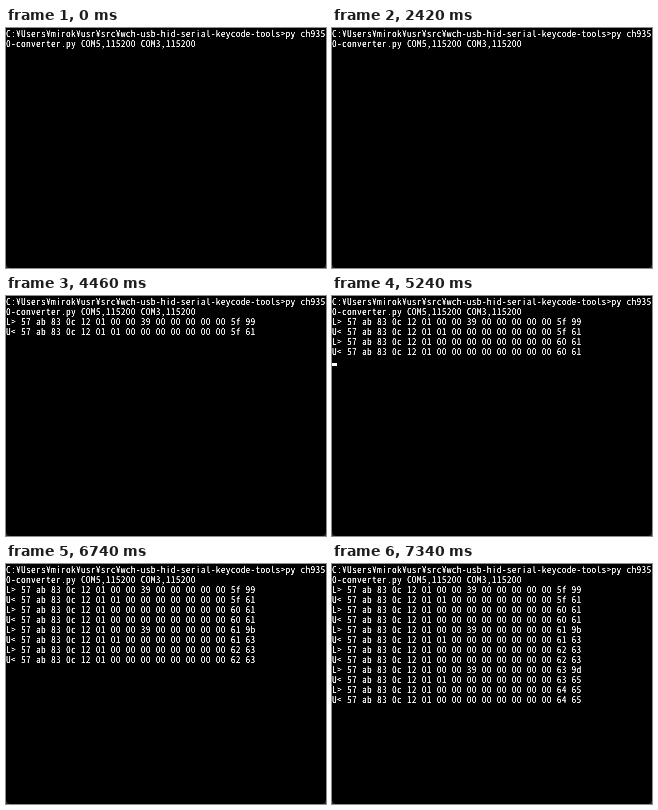
These frames come from a looping animation (320x240 px, 8 s). An HTML page:

```html
<!DOCTYPE html>
<html lang="ja">
<head>
<meta charset="utf-8">
<title>Serial console</title>
<style>
  html, body { margin: 0; width: 100%; height: 100%; overflow: hidden; background: #000; }
  svg { display: block; width: 320px; height: 240px; }
  text {
    font: 9.5px "Noto Sans Mono CJK JP", "Noto Sans Mono", "DejaVu Sans Mono", monospace;
    font-size-adjust: ch-width 0.5;
    letter-spacing: 0.25px;
    font-variant-ligatures: none;
    font-kerning: none;
    text-rendering: geometricPrecision;
    white-space: pre;
    fill: #e8e8e8;
  }
</style>
</head>
<body>
<svg viewBox="0 0 320 240">
  <!-- Hardens the glyph edges for a bitmap-font look. -->
  <filter id="crisp" filterUnits="userSpaceOnUse" x="0" y="0" width="320" height="240"
          color-interpolation-filters="sRGB">
    <feComponentTransfer><feFuncA type="linear" slope="2" intercept="-0.3"/></feComponentTransfer>
  </filter>
  <g id="screen" filter="url(#crisp)"></g>
  <rect id="cursor" width="5" height="3" fill="#fff"/>
  <path d="M0 235q0 5 5 5H0zM320 235q0 5-5 5h5z" fill="#2a2a2a"/>
</svg>
<script>
const LOOP = 8000, CELL = 5, LINE = 10, FIRST_SEQ = 0x5f;
const command = [
  'C:¥Users¥mirok¥usr¥src¥wch-usb-hid-serial-keycode-tools>py ch935',
  '0-converter.py COM5,115200 COM3,115200',
];
const enterTime = 1160;
const pairTimes = [4460, 4640, 5720, 5960, 7160, 7340];
const cursorOn = [[500, 980], [1160, 1460], [1940, 2420], [2900, 3380], [3860, 4340], [5240, 6740]];

const screen = document.getElementById('screen');
const cursor = document.getElementById('cursor');

function addLine(text, row) {
  const el = document.createElementNS('http://www.w3.org/2000/svg', 'text');
  el.setAttribute('y', row * LINE + 9);
  el.textContent = text;
  screen.append(el);
  return el;
}

// The last byte is the sum of the payload and the sequence number.
function packet(prefix, led, key, seq) {
  const bytes = [0x57, 0xab, 0x83, 0x0c, 0x12, 1, led, 0, key, 0, 0, 0, 0, 0, seq, 1 + led + key + seq];
  return prefix + ' ' + bytes.map(b => b.toString(16).padStart(2, '0')).join(' ');
}

command.forEach(addLine);
const pairs = pairTimes.map((time, n) => {
  const pressed = n % 2 === 0, seq = FIRST_SEQ + n, row = 2 + 2 * n;
  return [
    addLine(packet('L>', 0, pressed ? 0x39 : 0, seq), row),
    addLine(packet('U<', pressed ? 1 : 0, 0, seq), row + 1),
  ];
});

const show = (el, visible) => el.setAttribute('visibility', visible ? 'visible' : 'hidden');

function draw(t) {
  pairs.forEach((pair, n) => pair.forEach(el => show(el, t >= pairTimes[n])));
  const entered = t >= enterTime;
  const row = entered ? 2 + 2 * pairTimes.filter(time => t >= time).length : 1;
  cursor.setAttribute('x', entered ? 0 : command[1].length * CELL);
  cursor.setAttribute('y', row * LINE + 7);
  show(cursor, cursorOn.some(([from, to]) => t >= from && t < to));
}

const start = performance.now();
function tick() {
  draw((performance.now() - start) % LOOP);
  requestAnimationFrame(tick);
}
tick();
</script>
</body>
</html>
```
